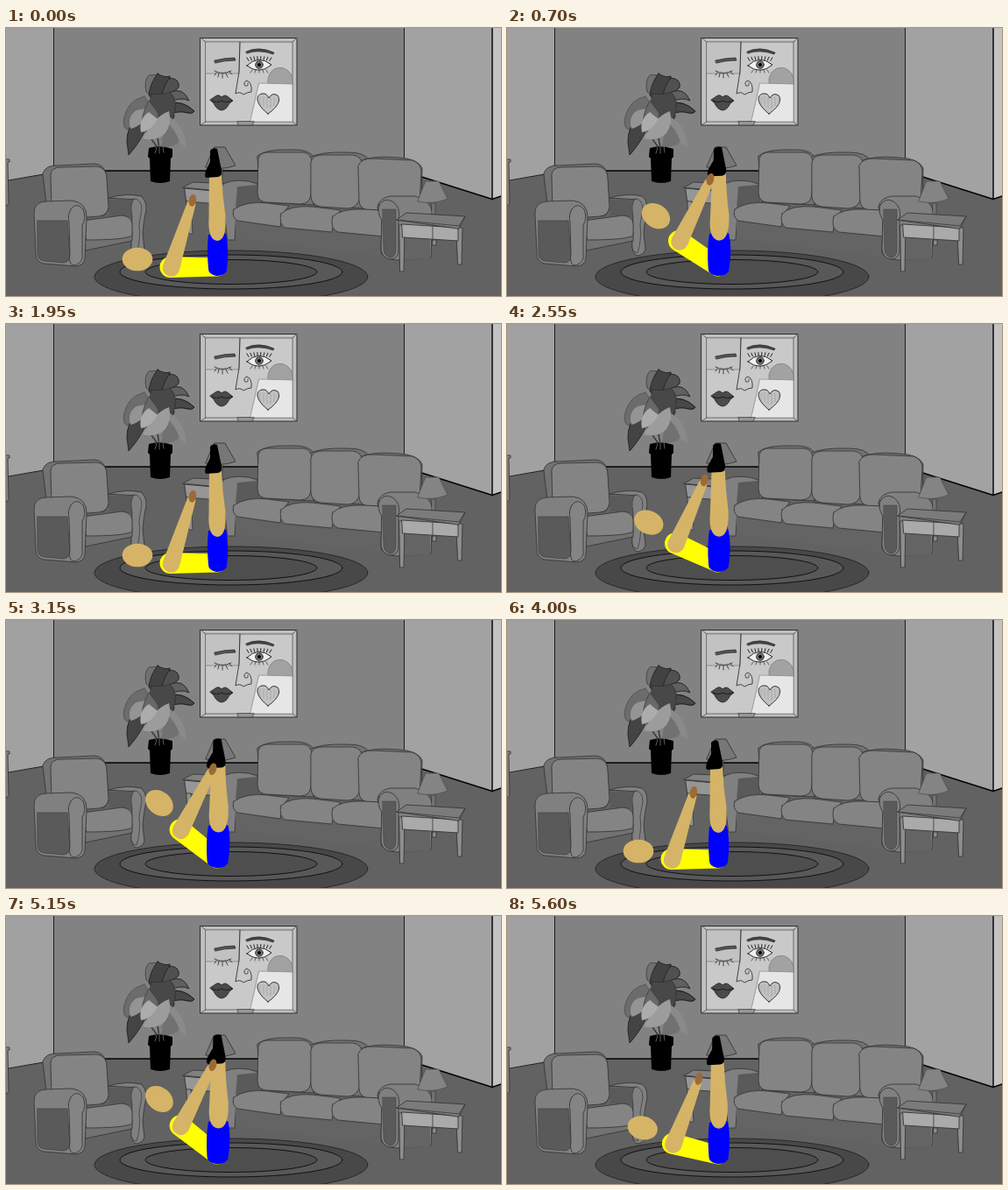
Write an HTML page with a canvas that moves like this. It is 565 by 306 pixels and loops after 5.65 s.

```html
<!DOCTYPE html>
<html>
<head>
<meta charset="utf-8">
<title>Floor exercise</title>
<style>
html, body { margin: 0; width: 100%; height: 100%; overflow: hidden; background: #828282; }
canvas { display: block; width: 565px; height: 306px; }
</style>
</head>
<body>
<canvas id="stage" width="565" height="306"></canvas>
<script>
const W = 565, H = 306, LOOP = 5650, STEP = 50, REP = 2000;
const ctx = document.getElementById('stage').getContext('2d');
const room = document.createElement('canvas');
room.width = W;
room.height = H;
let g = room.getContext('2d');

function shape(d, fill, line, width = .9) {
  const p = new Path2D(d);
  if (fill) { g.fillStyle = fill; g.fill(p); }
  if (line) { g.strokeStyle = line; g.lineWidth = width; g.stroke(p); }
}

function oval(x, y, rx, ry, fill, line, turn = 0, width = 1) {
  g.beginPath();
  g.ellipse(x, y, rx, ry, turn, 0, Math.PI * 2);
  if (fill) { g.fillStyle = fill; g.fill(); }
  if (line) { g.strokeStyle = line; g.lineWidth = width; g.stroke(); }
}

const INK = '#383838', SOFT = '#848484', SIDE = '#727272', ARM = '#808080', DARK = '#5a5a5a';

function drawWalls() {
  shape('M0 0H565V306H0Z', '#626262');
  shape('M54 0H455V163H54Z', '#828282');
  shape('M0 0H54V165L0 175Z', '#a1a1a1');
  shape('M455 0H555V196L455 164Z', '#a2a2a2');
  shape('M555 0H565V192L555 196Z', '#c2c2c2');
  shape('M54.5 0V163M454.5 0V163M0 174.5L54 165', null, '#111');
  shape('M54 163H455', null, '#000', 1.7);
  shape('M454 163.5L555 195.5L565 192M555 0V195', null, '#000', 1.4);
  shape('M0 150H4V153H2L3 201L0 203Z', '#858585', INK);
}

function drawPicture() {
  shape('M222 11.5H332V111H222Z', '#c0c0c0', '#222');
  shape('M228 16H327V107H228Z', '#c9c9c9', '#555', .8);
  shape('M222 11L228 16M332 11L327 16M222 111L228 107M332 111L327 107', null, '#444', .8);
  shape('M228 16H267L266 52H228Z', '#c2c2c2', '#777', .7);
  shape('M299 63A14 15 0 0 1 327 58V64Z', '#a2a2a2', '#777', .7);
  shape('M289 63L327 64V107H279Z', '#e6e6e6', '#888', .7);
  shape('M264 107L265 111H281L283 107Z', '#999', '#333', .7);

  shape('M267 16L266 50L262 75Q267 72 271 76Q276 73 280 73Q281 62 275 60Q270 62 273 66Q277 67 276 63', null, '#222', .8);
  shape('M238 37Q250 34 261 34L262 37Q249 37 239 40Z', '#555', '#222', .7);
  shape('M274 27Q288 20 306 28L305 30Q288 24 275 29Z', '#444', '#222', .6);
  shape('M238 49Q247 54 257 49M240 51L238 54M243 52L242 56M247 52V57M251 52L253 56M255 50L258 53', null, '#222', .8);

  shape('M275 43Q288 30 303 42Q289 54 275 43Z', '#f0f0f0', '#111', .9);
  oval(289, 42, 4.3, 4.3, '#777', '#111', 0, .8);
  oval(289, 42, 2, 2, '#000');
  for (let i = 0; i < 8; i++) {
    const x = 277 + i * 3.4, y = 38 - Math.sin((i + 1) / 9 * Math.PI) * 2;
    shape(`M${x} ${y}L${x + (i - 3.5) * .6} ${y - 3.5}`, null, '#111', .9);
  }
  for (let i = 0; i < 5; i++) {
    const x = 281 + i * 4;
    shape(`M${x} 48L${x + i - 2} 51`, null, '#333', .7);
  }

  shape('M233 82L239 78Q243 75 246 79Q250 75 254 79L259 83L255 86Q251 94 246 94Q240 93 237 86Z', '#4a4a4a', '#222', .8);
  shape('M235 83Q241 86 246 83Q251 86 258 83', null, '#111', .8);
  shape('M299 98C285 87 284 77 292 75Q298 74 300 80Q304 73 310 77C315 83 308 92 299 98Z', '#c2c2c2', '#222', .9);
  for (let i = 0; i < 6; i++) {
    const x = 290 + i * 4;
    shape(`M${x} 79V${92 - Math.abs(i - 2.5) * 2}`, null, '#999', .6);
  }
}

function drawPlant() {
  shape('M175 138Q170 110 172 90M177 138Q185 116 192 100M174 138Q162 122 156 110', null, '#333', 1.4);
  shape('M163 54Q157 60 160 73L166 77L173 54Z', '#707070', '#444');
  shape('M173 52Q164 64 163 77Q167 82 175 77Q188 72 187 55Q180 57 173 52Z', '#424242', '#222');
  shape('M187 57Q199 58 197 68Q190 75 178 77Q180 65 187 57Z', '#505050', '#222');
  shape('M188 73Q202 67 209 83Q199 78 186 85Z', '#606060', '#222');
  shape('M186 86Q202 82 215 95Q213 99 203 96Q193 95 182 100Z', '#484848', '#111');
  shape('M158 78Q140 82 135 101Q132 114 139 116Q154 105 162 86Z', '#6c6c6c', '#555');
  shape('M153 98Q137 113 138 130L140 145Q153 131 161 112Z', '#444', '#222');
  shape('M166 75Q178 77 187 73Q198 84 190 104Q170 106 164 91Z', '#484848', '#333');
  shape('M149 94Q138 101 142 115Q152 113 160 103L159 92Z', '#949494');
  shape('M163 83Q152 102 157 119Q173 118 174 98Z', '#686868', '#444');
  shape('M185 101Q204 109 206 137Q194 127 180 125Z', '#8a8a8a');
  shape('M182 106Q193 115 198 130Q190 137 177 136Z', '#717171');
  shape('M186 95Q169 101 156 126Q171 130 181 121Q190 110 186 95Z', '#9c9c9c');
  shape('M163 96Q151 104 154 119Q165 118 173 104Z', '#acacac');
  shape('M163 137Q176 133 190 138V147L188 149L187 175Q176 179 165 175L164 149L162 147Z', '#000');
  shape('M170 143L172 136M175 143V134M180 142L179 135', null, '#777', .8);
}

function drawChair() {
  shape('M42 166Q45 156 60 157L101 155Q112 156 114 166L117 207L112 214H48Z', SIDE, INK);
  shape('M51 167Q52 159 62 159L104 158Q115 160 115 172L117 204Q116 214 106 215L65 218Q53 216 52 205Z', SOFT, INK);
  shape('M117 194Q138 188 154 192Q160 196 160 207Q157 221 156 234L158 253Q155 260 148 260Q142 256 143 246L144 215Q142 201 146 196Z', ARM, INK);
  shape('M117 197L145 196Q142 203 144 216L118 214Z', DARK);
  shape('M146 195Q155 195 155 207L152 224Q154 242 149 257Q142 256 143 246L144 215Q141 202 146 195Z', ARM, INK, .7);
  shape('M88 238L144 232V243L91 254Z', '#727272', INK);
  shape('M88 220L132 214Q143 215 144 223V237Q136 242 92 242Z', SOFT, INK);
  shape('M32 211Q32 199 45 198L75 197Q92 199 92 216L90 263Q89 271 80 272L43 269Q34 267 34 258Z', ARM, INK);
  shape('M36 220H70L73 262Q71 268 65 268L43 266Q36 265 36 257Z', DARK, INK, .6);
  shape('M74 207Q80 198 88 207Q92 217 87 225L87 263Q84 271 76 271Q71 267 73 258L72 222Q70 213 74 207Z', SOFT, INK);
}

function drawSofa() {
  // small table and lamp behind the sofa
  shape('M238 136H250L262 157Q245 163 228 159Z', '#777', INK);
  shape('M243 161V178H247V161', '#666', INK, .7);
  shape('M202 182L213 176L262 178L258 187Z', '#808080', INK);
  shape('M204 183L257 188V202L206 198Z', '#969696', INK);
  shape('M206 198H211L213 235H209Z', '#909090', INK, .8);

  shape('M246 180Q254 172 277 175L287 178L288 201L263 210L261 242H253Z', ARM, INK);
  shape('M264 181L287 179L288 200L262 206Z', DARK);
  shape('M287 146Q296 138 326 139Q345 138 351 147V202L292 199Z', SIDE, INK);
  shape('M346 148Q358 141 390 142Q410 142 414 151L410 206L352 203Z', SIDE, INK);
  shape('M402 153Q415 145 448 148Q470 149 475 160L474 205L408 208Z', SIDE, INK);
  shape('M288 149Q290 141 302 142L340 142Q349 144 349 154L348 190Q347 201 335 201L297 199Q287 198 287 188Z', SOFT, INK);
  shape('M348 153Q350 145 361 145L396 145Q407 147 406 156L404 193Q402 206 389 206L359 204Q349 202 348 193Z', SOFT, INK);
  shape('M402 157Q405 149 418 149L464 151Q475 155 474 166L472 197Q470 207 459 207L414 208Q404 207 403 198Z', SOFT, INK);

  shape('M262 219L316 229L374 235L432 237V261L371 254L262 240Z', '#646464');
  shape('M260 207Q275 197 299 200L323 203Q315 211 313 227L264 220Q257 215 260 207Z', SOFT, INK);
  shape('M314 212Q324 202 350 204L382 208Q374 218 372 233L318 228Q311 223 314 212Z', SOFT, INK);
  shape('M373 215Q383 206 408 207L430 208L431 238L379 233Q369 229 373 215Z', SOFT, INK);

  shape('M424 204Q426 194 439 192L467 192Q484 196 487 211L485 262L446 265Q429 263 428 256L429 219Z', ARM, INK);
  shape('M426 202Q432 193 441 198Q451 204 448 219L448 252Q449 263 439 264Q429 263 428 252L429 219Q423 211 426 202Z', ARM, INK);
  shape('M430 207H445V255Q444 262 438 262Q431 260 431 252Z', DARK, INK, .5);
  shape('M449 232L484 230V263L449 265Z', '#646464');
}

function drawTable() {
  shape('M479 175H494L504 195Q488 202 470 198Z', '#848484', '#555');
  shape('M486 200H490V213H486Z', '#737373', INK, .6);
  shape('M449 225H455L454 278H450ZM514 228H521L520 270H516ZM487 242H491V248H487Z', '#8e8e8e', INK);
  shape('M452 224L516 228V243L453 239Z', '#aaa', INK);
  shape('M487 227V242', null, INK, .8);
  shape('M446 219L457 211L524 215L517 229Z', '#7b7b7b', INK);
  shape('M446 219L517 226L524 215', null, INK, .8);
}

function drawRug() {
  oval(257, 284, 156, 30, '#484848', '#292929');
  oval(257, 278.5, 127, 19.5, '#585858', '#111');
  oval(257, 278.5, 98, 14, '#4e4e4e', '#111');
}

function drawRoom() {
  g.lineJoin = g.lineCap = 'round';
  drawWalls();
  drawPicture();
  drawPlant();
  drawChair();
  drawSofa();
  drawTable();
  drawRug();
}

const HIP = { x: 241, y: 272 }, SKIN = '#d5b467';
const ease = x => (1 - Math.cos(Math.PI * Math.min(1, Math.max(0, x)))) / 2;
const rad = deg => deg * Math.PI / 180;

// rise, short hold, fall
function lift(ms) {
  const t = ms % REP;
  return ease((t - 50) / 850) - ease((t - 1100) / 850);
}

function turned(x, y, a) {
  return {
    x: HIP.x + x * Math.cos(a) - y * Math.sin(a),
    y: HIP.y + x * Math.sin(a) + y * Math.cos(a)
  };
}

// tapered limb with round ends
function limb(a, ra, b, rb, fill) {
  const dir = Math.atan2(b.y - a.y, b.x - a.x);
  const spread = Math.acos((ra - rb) / Math.hypot(b.x - a.x, b.y - a.y));
  g.beginPath();
  g.arc(a.x, a.y, ra, dir + spread, dir - spread);
  g.arc(b.x, b.y, rb, dir - spread, dir + spread);
  g.closePath();
  g.fillStyle = fill;
  g.fill();
}

function drawPerson(p) {
  const bend = rad(39 * p);
  const shoulder = turned(-53.5, 1, bend);
  const head = turned(-91, -8, bend);
  limb(shoulder, 12, { x: HIP.x, y: HIP.y + 1 }, 10.5, '#ff0');
  oval(head.x, head.y, 17.3, 13.3, SKIN, null, bend);

  g.save();
  g.translate(HIP.x, HIP.y);
  g.rotate(rad(2 * p));
  g.scale(1 + .14 * p, 1 + .015 * p);
  g.translate(-HIP.x, -HIP.y);
  shape('M231 236Q241 231 251 235Q255 252 252 277Q249 283 240 283Q231 281 231 275Q229 253 231 236Z', '#00f');
  shape('M232 168H246Q247 190 250.5 214Q252 243 241 243Q230 242 231.5 216Z', SKIN);
  shape('M233 140Q236 136 241 138L246 162Q247 169 242 170L229 171Q226 170 228 163L233 153Z', '#000');
  g.restore();

  const tilt = rad(17.5 + 10 * p), reach = 82 - 2 * p;
  const at = r => ({ x: shoulder.x + 1 + r * Math.sin(tilt), y: shoulder.y + 1 - r * Math.cos(tilt) });
  limb(at(0), 9.8, at(reach - 6), 5, SKIN);
  const hand = at(reach - 1);
  oval(hand.x, hand.y, 4.2, 7, '#9c6b35', null, tilt * .6);
}

drawRoom();
g = ctx;
const start = performance.now();

function frame() {
  const ms = (performance.now() - start) % LOOP;
  ctx.drawImage(room, 0, 0);
  drawPerson(lift(Math.floor(ms / STEP) * STEP));
  requestAnimationFrame(frame);
}
frame();
</script>
</body>
</html>
```
